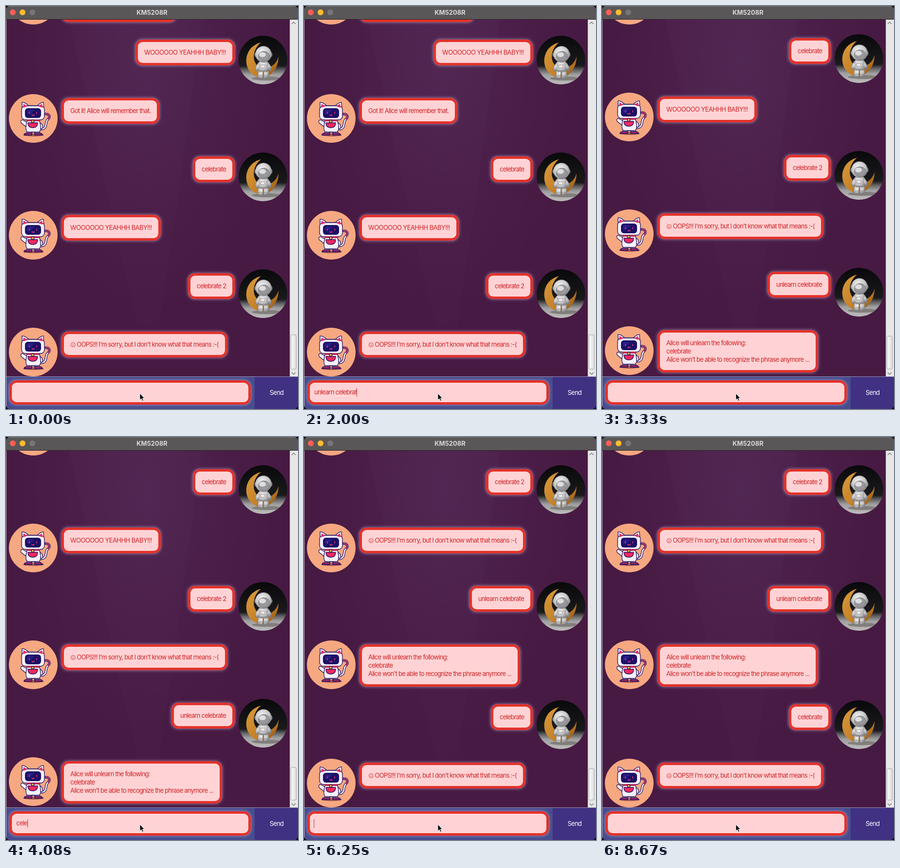
Recreate the animation shown at these times as an HTML page. Size 600 by 828 pixels, loop 8760 ms.

```html
<!DOCTYPE html>
<html lang="en">
<head>
<meta charset="utf-8">
<title>Chat</title>
<style>
  html, body { margin: 0; width: 100%; height: 100%; overflow: hidden; background: #000; }
  svg { display: block; width: 100%; height: 100%; }
  text { font: 13px Inter, "DejaVu Sans", sans-serif; letter-spacing: -.8px; white-space: pre; fill: #cf2427; }
  .shout { letter-spacing: -.58px; }
  .face { font-size: 11px; }
  .title { font-size: 13px; font-weight: 700; letter-spacing: 0; fill: #d9d7d8; }
  .send { fill: #fff; }
  .box { fill: #ffd3d5; stroke: #e3302c; stroke-width: 5; }
</style>
</head>
<body>
<svg viewBox="0 0 600 828" xmlns="http://www.w3.org/2000/svg">
  <defs>
    <clipPath id="window"><rect width="600" height="828" rx="8"/></clipPath>
    <clipPath id="view"><rect x="1" y="28" width="582" height="733"/></clipPath>
    <clipPath id="disc"><circle r="50"/></clipPath>
    <radialGradient id="haze" gradientUnits="userSpaceOnUse" cx="0" cy="0" r="1" gradientTransform="translate(290 110) scale(270 520)">
      <stop offset="0" stop-color="#4f2650"/>
      <stop offset=".55" stop-color="#4a1e48"/>
      <stop offset="1" stop-color="#471a43"/>
    </radialGradient>
    <linearGradient id="ray" x2="0" y2="1">
      <stop offset="0" stop-color="#7a4a80" stop-opacity=".06"/>
      <stop offset="1" stop-color="#7a4a80" stop-opacity=".03"/>
    </linearGradient>
    <linearGradient id="thumbFill">
      <stop offset="0" stop-color="#fafafa"/>
      <stop offset="1" stop-color="#dedede"/>
    </linearGradient>
    <linearGradient id="sky" x2="0" y2="1">
      <stop offset="0" stop-color="#09090b"/>
      <stop offset=".62" stop-color="#1a1a1c"/>
      <stop offset=".7" stop-color="#5f5f61"/>
      <stop offset=".8" stop-color="#a09f9f"/>
      <stop offset="1" stop-color="#bdbcbb"/>
    </linearGradient>
    <linearGradient id="gold" x2="1" y2="1">
      <stop offset="0" stop-color="#d99a3c"/>
      <stop offset=".6" stop-color="#c68127"/>
      <stop offset="1" stop-color="#8f5413"/>
    </linearGradient>
    <radialGradient id="steel" cx=".42" cy=".35" r=".7">
      <stop offset="0" stop-color="#f3f3f3"/>
      <stop offset=".6" stop-color="#c6c6c8"/>
      <stop offset="1" stop-color="#828286"/>
    </radialGradient>
    <filter id="glow" filterUnits="userSpaceOnUse" x="-20" y="-20" width="640" height="900">
      <feDropShadow dx="0" dy="0" stdDeviation="3" flood-color="#c4b6da" flood-opacity=".75"/>
    </filter>

    <g id="bot">
      <circle r="50" fill="#f6a881"/>
      <ellipse cx="1" cy="34" rx="21" ry="3" fill="#a85a50"/>
      <g stroke="#25155f" stroke-width="1.3" stroke-linejoin="round" stroke-linecap="round">
        <path d="M14 22C31 23 23 7 30 2C36-3 33-10 25-9" fill="none" stroke-width="5"/>
        <path d="M14 22C31 23 23 7 30 2C36-3 33-10 25-9" fill="none" stroke="#f5effb" stroke-width="2.6"/>
        <path d="M31 1C35-3 33-10 25-9" fill="none" stroke="#a92762" stroke-width="2.6"/>
        <path d="M-13 8L-22 3Q-27 3-25 9L-15 17ZM13 8L18 12Q21 19 17 22L13 17Z" fill="#f5effb"/>
        <path d="M-13 23V30Q-19 31-19 34H-3V28H3V34H19Q19 31 13 30V23Z" fill="#f5effb"/>
        <path d="M-19 34Q-18 30-12 30H-3V34ZM3 34V30H12Q18 30 19 34Z" fill="#b02464"/>
        <path d="M-13 5H13Q18 26 11 28H-11Q-18 26-13 5Z" fill="#f5effb"/>
        <path d="M-11 9H9Q9 19-1 19T-11 9Z" fill="#f0285f"/>
        <path d="M-23-19L-23-33Q-18-34-9-26H8Q17-34 21-33L22-19Z" fill="#f5effb"/>
        <rect x="-24" y="-26" width="47" height="29" rx="8" fill="#f5effb"/>
        <path d="M-12 4H11" stroke="#d72554" stroke-width="2.8"/>
        <circle cx="-1" cy="6" r="2.8" fill="#f2b43c"/>
      </g>
      <path d="M-21-22L-20-30L-12-25ZM19-22L18-30L10-25Z" fill="#f0285f"/>
      <rect x="-17" y="-21" width="33" height="20" rx="6" fill="#1b1265"/>
      <path d="M-13-14Q-13-18-8-18H2L-6-9H-13Z" fill="#2b1d85"/>
      <path d="M-8-13V-10M7-13V-10M-3-7Q-1.7-5-.5-7Q.7-5 2-7" fill="none" stroke="#ed2c78" stroke-width="1.6" stroke-linecap="round"/>
    </g>

    <g id="toy" clip-path="url(#disc)">
      <rect x="-50" y="-50" width="100" height="100" fill="url(#sky)"/>
      <ellipse cx="8" cy="38" rx="31" ry="4" fill="#6f6c69" opacity=".7"/>
      <path d="M-4-36C-38-28-44 14-19 31C5 46 32 25 32-7C26 14 6 22-9 13C-25 2-20-24-4-36Z" fill="url(#gold)"/>
      <g fill="url(#steel)" stroke="#77777b" stroke-width=".7">
        <path d="M-9 21H0L-1 37Q-9 39-11 35ZM2 21H11L12 35Q9 39 2 37Z"/>
        <rect x="-10" y="3" width="22" height="21" rx="5"/>
        <path d="M-9 5L-15 14Q-17 23-12 23L-7 14ZM11 5L17 14Q18 23 14 23L9 14Z"/>
        <rect x="-17" y="-16" width="36" height="10" rx="4"/>
        <circle cx="1" cy="-12" r="16.5"/>
      </g>
      <ellipse cx="2" cy="-8" rx="11.5" ry="10" fill="#98989c" stroke="#6c6c70" stroke-width=".8"/>
      <ellipse cx="-1" cy="-11" rx="7" ry="5" fill="#dededf"/>
      <path d="M-5 10H7V16H-5ZM-8 22H10M-10 32H-1M2 32H12" fill="#ececec" stroke="#8c8c90"/>
      <circle cx="4" cy="13" r="1" fill="#b84b43"/>
    </g>
  </defs>

  <g clip-path="url(#window)">
    <rect width="600" height="828" fill="#471a43"/>
    <rect y="28" width="600" height="733" fill="url(#haze)"/>
    <path d="M130 28H402L350 420L315 660H270L215 420Z" fill="url(#ray)"/>
    <g id="chat" clip-path="url(#view)"></g>

    <rect x="583" y="28" width="17" height="733" fill="#e7e7e7"/>
    <path d="M583.5 28V761" stroke="#c9c5c9"/>
    <path d="M587 37L591 33L595 37M587 753L591 757L595 753" fill="none" stroke="#6d6d6d" stroke-width="1.2"/>
    <rect id="thumb" x="585.5" width="11" rx="2.5" fill="url(#thumbFill)" stroke="#a5a5a5"/>

    <rect y="761" width="512" height="67" fill="#484b8d"/>
    <rect x="511" y="761" width="89" height="67" fill="#403183"/>
    <path d="M0 761.5H600" stroke="#9b93b4"/>
    <rect class="box" x="9.5" y="771.5" width="491" height="45" rx="12" filter="url(#glow)"/>
    <text id="typed" x="21" y="798"></text>
    <rect id="caret" y="785" width="1" height="18" fill="#c6393c"/>
    <text class="send" x="556" y="798.5" text-anchor="middle">Send</text>

    <path d="M.5 28V828" stroke="#b4a8b6"/>
    <rect width="600" height="27" fill="#595758"/>
    <path d="M0 .5H600" stroke="#7b797a"/>
    <path d="M0 27.5H600" stroke="#2c2029"/>
    <circle cx="14" cy="13" r="6" fill="#fe5f57"/>
    <circle cx="34" cy="13" r="6" fill="#febc2e"/>
    <circle cx="54" cy="13" r="6" fill="#777576"/>
    <text class="title" x="300" y="17.5" text-anchor="middle">KM5208R</text>
    <path d="M275 796V809.5L278.2 806.7L280.3 811.4L282.5 810.4L280.4 805.9H284.4Z" fill="#000" stroke="#fff" stroke-width=".9"/>
  </g>
</svg>
<script>
const LOOP = 8760, FPS = 12, TYPE_MS = 1000, GAP = 20, BOTTOM = 761;
const FACE = '☹';
const oops = FACE + " OOPS!!! I'm sorry, but I don't know what that means :-(";
const cheer = 'WOOOOOO YEAHHH BABY!!!';
const inputs = [
  { text: 'unlearn celebrate', start: 170, step: 115, send: 2360,
    reply: "Alice will unlearn the following:\ncelebrate\nAlice won't be able to recognize the phrase anymore ..." },
  { text: 'celebrate', start: 3720, step: 105, send: 4745, reply: oops }
];

const byId = id => document.getElementById(id);
const chat = byId('chat'), typed = byId('typed'), caret = byId('caret'), thumb = byId('thumb');

function add(parent, tag, attrs = {}) {
  const el = document.createElementNS('http://www.w3.org/2000/svg', tag);
  set(el, attrs);
  parent.appendChild(el);
  return el;
}
function set(el, attrs) {
  for (const key in attrs) el.setAttribute(key, attrs[key]);
}

function message(user, text, at = -TYPE_MS, minWidth = 0) {
  const row = add(chat, 'g');
  add(row, 'use', { href: user ? '#toy' : '#bot', x: user ? 528 : 56, y: 50 });
  const box = add(row, 'rect', { class: 'box', y: 10.5, rx: 12, filter: 'url(#glow)' });
  const lines = text.split('\n').map((_, i) =>
    add(row, 'text', { y: 38.5 + 17 * i, class: text === cheer ? 'shout' : '' }));
  return { user, text, at, minWidth, row, box, lines, shown: null, height: 100 };
}

const messages = [
  message(false, '\n\n', undefined, 236),
  message(true, cheer),
  message(false, 'Got it! Alice will remember that.'),
  message(true, 'celebrate'),
  message(false, cheer),
  message(true, 'celebrate 2'),
  message(false, oops),
  ...inputs.flatMap(i => [message(true, i.text, i.send), message(false, i.reply, i.send)])
];

function easeBoth(x) {
  if (x < .2) return 3.125 * x * x;
  if (x > .8) return 1 - 3.125 * (1 - x) ** 2;
  return 1.25 * x - .125;
}

// The face is set smaller than the words after it.
function write(line, text) {
  line.textContent = '';
  if (text.startsWith(FACE)) {
    add(line, 'tspan', { class: 'face' }).textContent = FACE;
    text = text.slice(FACE.length);
  }
  line.append(text);
}

function fill(m, shown) {
  if (m.shown === shown) return;
  m.shown = shown;
  const parts = shown.split('\n');
  m.lines.forEach((line, i) => write(line, parts[i] || ''));
  const textWidth = Math.max(...m.lines.map(l => l.textContent ? l.getComputedTextLength() : 0));
  const w = Math.max(m.minWidth, Math.round(textWidth) + 36);
  const h = 53 + 17 * (parts.length - 1);
  const x = m.user ? 470 - w : 114;
  set(m.box, { x: x + 2.5, width: w - 5, height: h - 5 });
  m.lines.forEach(line => set(line, { x: x + 18 }));
  m.height = Math.max(100, h + 16);
}

function drawChat(t) {
  const live = messages.filter(m => {
    const on = t >= m.at;
    m.row.style.display = on ? '' : 'none';
    return on;
  });
  let total = -GAP;
  for (const m of live) {
    const p = easeBoth(Math.min(1, (t - m.at) / TYPE_MS));
    fill(m, m.text.slice(0, Math.round(p * m.text.length)));
    total += m.height + GAP;
  }
  let y = BOTTOM - total;
  for (const m of live) {
    set(m.row, { transform: `translate(0 ${y})` });
    y += m.height + GAP;
  }
  const top = Math.round(675 + (total - 823) / 85) + .5;
  set(thumb, { y: top, height: 746 - top });
}

function drawInput(t) {
  let text = '', last = -600;
  for (const i of inputs) {
    if (t >= i.send) {
      text = '';
      last = i.send;
    } else if (t >= i.start) {
      const n = Math.min(i.text.length, Math.floor((t - i.start) / i.step) + 1);
      text = i.text.slice(0, n);
      last = i.start + (n - 1) * i.step;
    }
  }
  typed.textContent = text;
  const x = text ? 21 + typed.getComputedTextLength() : 20;
  set(caret, { x: Math.round(x), visibility: (t - last) % 1000 < 520 ? 'visible' : 'hidden' });
}

function draw(ms) {
  const t = Math.floor((ms % LOOP + 4) * FPS / 1000) * 1000 / FPS;
  drawChat(t);
  drawInput(t);
}

let begin;
function tick(now) {
  begin ??= now;
  draw(Math.max(0, now - begin));
  requestAnimationFrame(tick);
}
draw(0);
requestAnimationFrame(tick);
</script>
</body>
</html>
```
